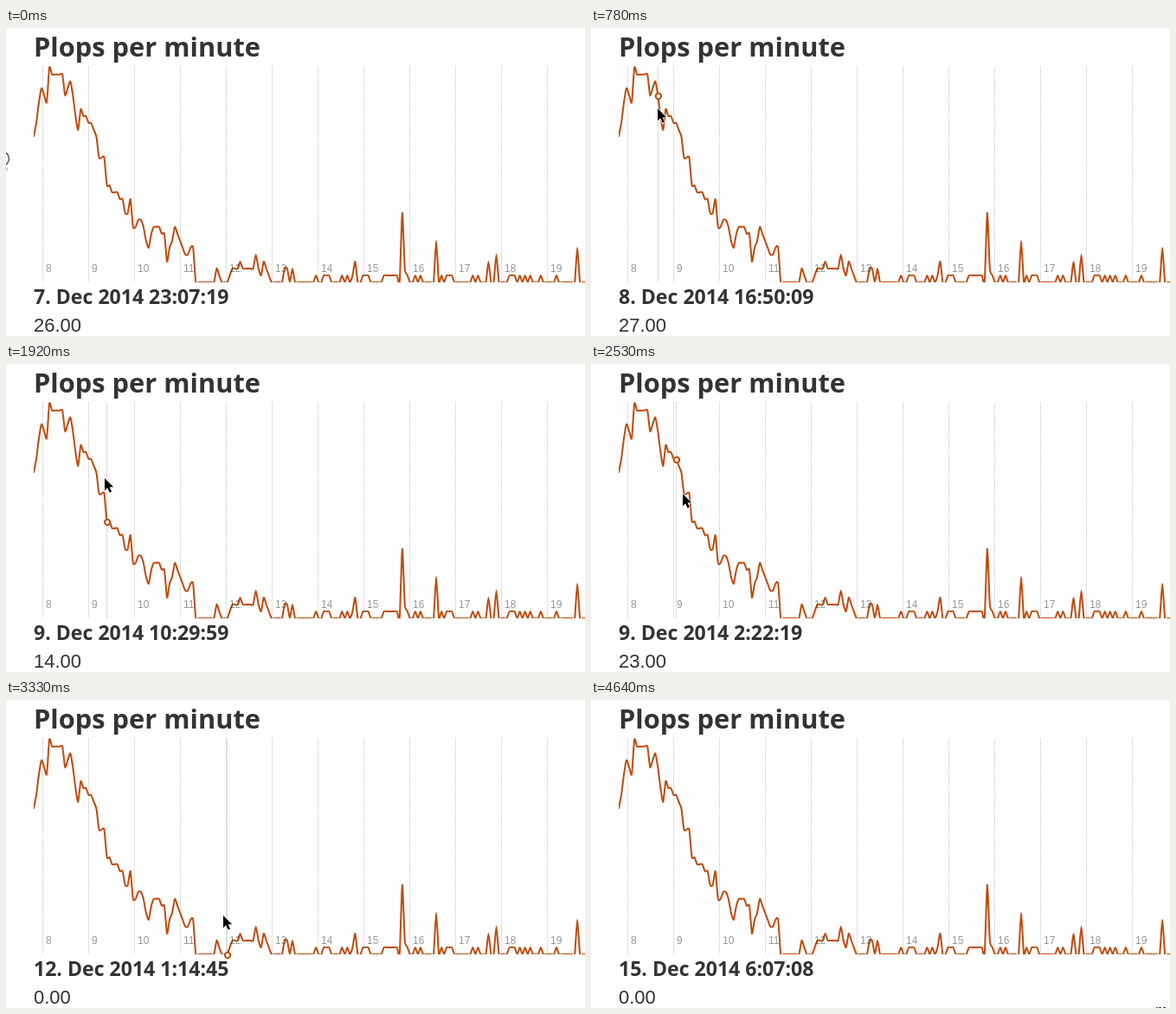
Animation of 669 by 356 pixels, one loop 4.7 s. Source, as an HTML page:

```html
<!DOCTYPE html>
<html lang="en">
<head>
<meta charset="utf-8">
<title>Plops per minute</title>
<style>
  html, body { margin: 0; width: 100%; height: 100%; overflow: hidden; background: #fefefe; }
  svg { display: block; }
  text { fill: #333; }
  .bold { font-family: "Open Sans", "Noto Sans", sans-serif; font-weight: 700; }
  .plain { font-family: "Liberation Sans", Arial, sans-serif; }
  #labels text { font-size: 12px; fill: #000; opacity: .4; }
  #grid path { stroke: #c4c4c4; stroke-dasharray: 1 1; }
  #curve { fill: none; stroke: #bd4c0e; stroke-width: 2; }
</style>
</head>
<body>
<svg width="669" height="356" viewBox="0 0 669 356">
  <clipPath id="plot"><rect x="32" y="44" width="637" height="250"/></clipPath>
  <text class="bold" x="32" y="33" font-size="30.8">Plops per minute</text>
  <g id="grid"></g>
  <path id="curve" clip-path="url(#plot)"/>
  <g id="labels" class="plain"></g>
  <text id="date" class="bold" x="32" y="319" font-size="23.1"></text>
  <text id="value" class="plain" x="32" y="351" font-size="22"></text>
  <g id="hover">
    <path d="M-.5 44V294" stroke="#000" stroke-opacity=".14"/>
    <circle id="dot" r="3.2" fill="#fefefe" stroke="#bd4c0e" stroke-width="2"/>
  </g>
  <g id="ring">
    <circle cx="-5" cy="151" r="8.5" fill="none" stroke="#333" stroke-width="1.2"/>
    <path d="M0 162.5H2M1 163V166" stroke="#bbb"/>
  </g>
  <path id="readout" d="M653 355.5h2m1 0h3m2 0h3" stroke="#444"/>
  <path id="cursor" d="M0 0V14.2L3.2 11.2L5.6 16.6L8 15.6L5.7 10.3H10.2Z"
        fill="#000" stroke="#fff" stroke-width="1.6" paint-order="stroke"/>
</svg>
<script>
const $ = id => document.getElementById(id);
const LOOP = 4700, FRAME = 87.5, COUNT = 213;
const LEFT = 32, STEP = 3.02, BASE = 294, UNIT = 8.01;

// Linear interpolation along rows of [position, ...values].
function along(rows, at) {
  const next = rows.findIndex(row => row[0] > at);
  if (next < 0) return rows[rows.length - 1].slice(1);
  const a = rows[next - 1], b = rows[next], p = (at - a[0]) / (b[0] - a[0]);
  return a.slice(1).map((v, i) => v + (b[i + 1] - v) * p);
}

// The turning points of the long decline; readings between them are rounded.
const turns = [[0, 21], [3, 28], [5, 26], [6, 31], [7, 30], [11, 30], [12, 27], [14, 29],
  [17, 22], [18, 25], [24, 21.4], [25, 18], [27, 18], [28, 14], [34, 12], [35, 10], [36, 10],
  [37, 12], [38, 8], [41, 9], [44, 5], [46, 8], [50, 7], [51, 3], [54, 8], [58, 4], [61, 5],
  [62, 0], [74, 0], [76, 2], [89, 2], [91, 0]];
const values = Array.from({ length: COUNT }, (_, i) => Math.round(along(turns, i)[0]));

// The quiet tail: single plops, short plateaus of one, and taller spikes.
for (const i of [108, 118, 120, 122, 143, 146, 148, 156, 168, 170, 186, 188, 190, 194, 200])
  values[i] = 1;
for (const i of [112, 127, 135, 138, 159, 183]) values.fill(1, i - 1, i + 2);
Object.assign(values, { 70: 2, 71: 1, 79: 3, 85: 4, 87: 1, 88: 3, 96: 2, 97: 2, 99: 2,
  123: 3, 141: 10, 142: 2, 154: 6, 174: 3, 177: 4, 208: 5 });

const px = i => LEFT + STEP * i;
const py = i => BASE - UNIT * values[i];

// Tight cardinal spline through the readings.
function curvePath() {
  const tangent = i => {
    const a = Math.max(i - 1, 0), b = Math.min(i + 1, COUNT - 1);
    return [(px(b) - px(a)) / 10, (py(b) - py(a)) / 10];
  };
  let d = `M${px(0)} ${py(0)}`;
  for (let i = 1; i < COUNT; i++) {
    const [ax, ay] = tangent(i - 1), [bx, by] = tangent(i);
    d += `C${px(i - 1) + ax} ${py(i - 1) + ay} ${px(i) - bx} ${py(i) - by} ${px(i)} ${py(i)}`;
  }
  return d;
}
$("curve").setAttribute("d", curvePath());

for (let day = 8; day < 20; day++) {
  const x = 42 + 53 * (day - 8);
  $("grid").innerHTML += `<path d="M${x + .5} 44V294"/>`;
  $("labels").innerHTML += `<text x="${x + 4}" y="282">${day}</text>`;
}

// Pointer stops: arrival step, departure step, x, y.
const stops = [[0, 0, -20, 160], [4, 4, 36, 100], [8, 10, 77, 93], [13, 14, 90, 97],
  [21, 22, 114, 132], [28, 28, 97, 142], [29, 29, 106, 150], [35, 37, 254, 252],
  [38, 38, 251, 249], [42, 42, 276, 262], [45, 45, 423, 289], [48, 48, 735, 373]];
const path = stops.flatMap(([from, to, x, y]) => [[from, x, y], [to, x, y]]);

// Reading index to seconds since 7 Dec 2014; the sampling interval drifts slightly.
const clock = [[2, 83239], [15, 147009], [20, 171686], [22, 181339],
  [28, 210599], [74, 436485], [130, 713228]];

// The highlighted reading trails the pointer by one step and stays once it leaves the plot.
function readingAt(step) {
  let seen = Math.max(step - 1, 0);
  while (along(path, seen)[1] > BASE) seen--;
  return Math.max(2, Math.floor((along(path, seen)[0] + 3.1 - LEFT) / STEP));
}

function dateText(seconds) {
  const d = new Date(Date.UTC(2014, 11, 7) + Math.round(seconds) * 1000);
  const two = n => String(n).padStart(2, "0");
  return `${d.getUTCDate()}. Dec 2014 ${d.getUTCHours()}:${two(d.getUTCMinutes())}:${two(d.getUTCSeconds())}`;
}

const show = (id, on) => $(id).setAttribute("visibility", on ? "visible" : "hidden");
const move = (id, x, y) => $(id).setAttribute("transform", `translate(${x} ${y})`);

function draw(now) {
  const step = Math.floor((now % LOOP + 13) / FRAME);
  const [x, y] = along(path, step);
  const i = readingAt(step), dotX = px(i) + .6, dotY = py(i) + 1;

  $("date").textContent = dateText(along(clock, i)[0]);
  $("value").textContent = values[i].toFixed(2);
  move("cursor", x, y);
  move("hover", dotX, 0);
  move("dot", 0, dotY);
  // The highlight vanishes while the pointer sits on the dot itself.
  show("hover", x > LEFT && y < BASE && Math.hypot(dotX - x, dotY - y) > 8);
  show("ring", step === 0);
  show("readout", step >= 53);
}

const start = performance.now();
function tick() {
  draw(performance.now() - start);
  requestAnimationFrame(tick);
}
tick();
</script>
</body>
</html>
```
